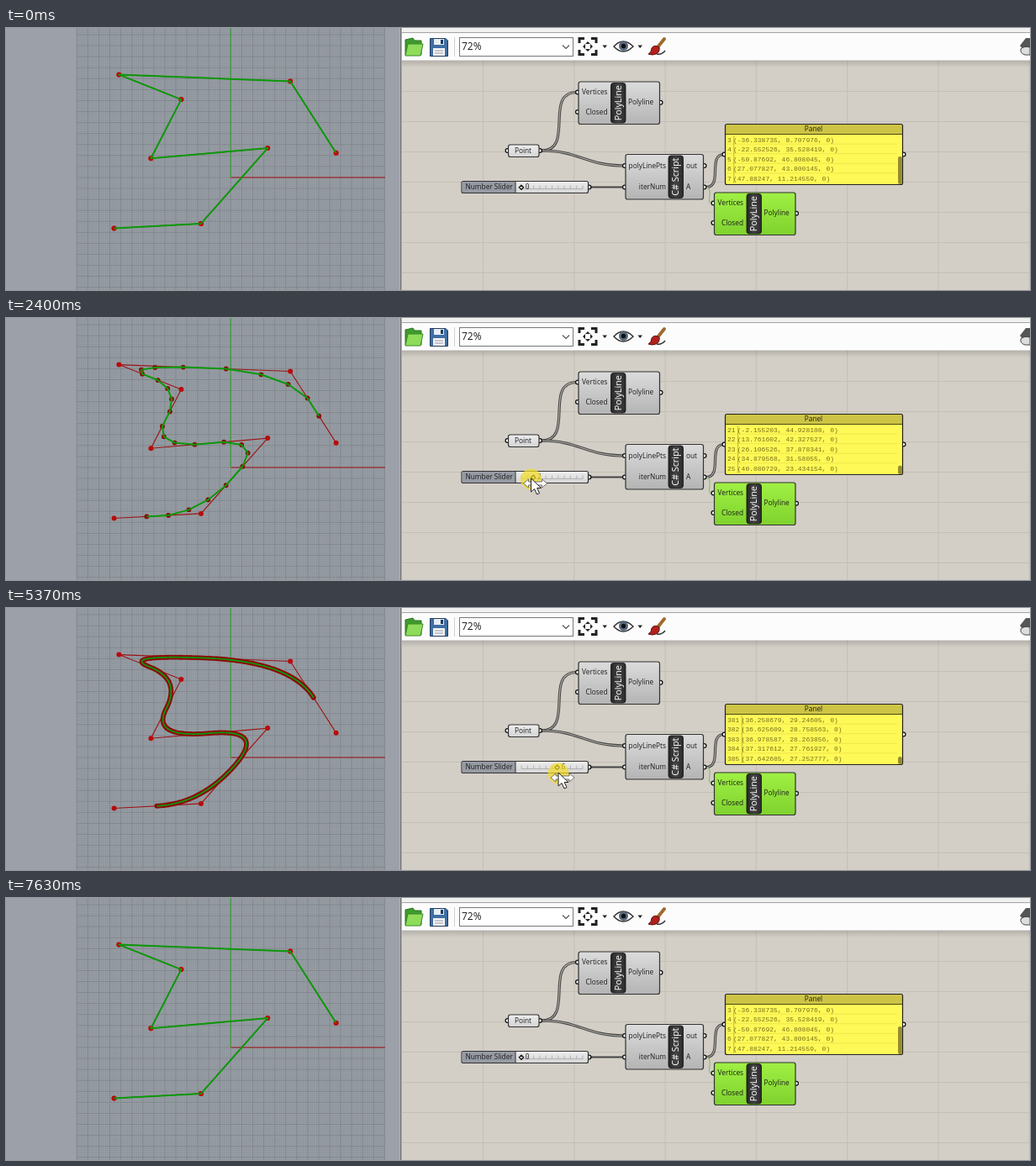
An HTML page for the animation above (7780 ms loop, 1218x312 px).

```html
<!DOCTYPE html>
<html lang="en">
<head>
<meta charset="utf-8">
<title>Corner cutting</title>
<style>
html, body { margin: 0; width: 100%; height: 100%; overflow: hidden; background: #9ca1a9; }
svg { display: block; width: 1218px; height: 312px; }
text { font: 8.3px "Open Sans", "Noto Sans", sans-serif; fill: #1c1c1c; white-space: pre; }
.end { text-anchor: end; }
.mid { text-anchor: middle; }
.tag { font-size: 10.8px; fill: #fff; text-anchor: middle; }
.row { font: 8px "Liberation Mono", monospace; fill: #777018; }
.dots { fill: none; stroke-linecap: round; }
</style>
</head>
<body>
<svg id="stage" viewBox="0 0 1218 312" xmlns="http://www.w3.org/2000/svg">
  <defs>
    <linearGradient id="grey" x2="0" y2="1"><stop stop-color="#dcdcdc"/><stop offset="1" stop-color="#b4b4b4"/></linearGradient>
    <linearGradient id="light" x2="0" y2="1"><stop stop-color="#eee"/><stop offset="1" stop-color="#d4d4d4"/></linearGradient>
    <linearGradient id="green" x2="0" y2="1"><stop stop-color="#a0f044"/><stop offset="1" stop-color="#7fd22e"/></linearGradient>
    <linearGradient id="black" x2="1" y2="0"><stop stop-color="#262626"/><stop offset=".5" stop-color="#444"/><stop offset="1" stop-color="#2a2a2a"/></linearGradient>
    <linearGradient id="shade" x2="0" y2="1"><stop stop-opacity=".16"/><stop offset="1" stop-opacity="0"/></linearGradient>
    <clipPath id="view"><rect width="451" height="312"/></clipPath>
  </defs>
  <rect width="1218" height="312" fill="#9ca1a9"/>
  <g id="viewport" clip-path="url(#view)">
    <rect x="83.5" width="367" height="312" fill="#989ea5"/>
    <path id="minor" stroke="#8b9198" stroke-width=".5"/>
    <path id="major" stroke="#7f858c" stroke-width=".8"/>
    <path d="M267.3 178H451" stroke="#983a3c" stroke-width="1.3"/>
    <path d="M267.3 178V0" stroke="#3a9a3c" stroke-width="1.3"/>
    <path id="cage" fill="none" stroke="#9c1212" stroke-width="1.1"/>
    <path id="cageDots" class="dots" stroke="#b80c0c" stroke-width="6"/>
    <path id="curveDots" class="dots" stroke="#8a0c08" stroke-width="5.8"/>
    <path id="curve" fill="none" stroke="#0a9a0a" stroke-width="2" stroke-linejoin="round"/>
  </g>

  <rect x="468" width="750" height="312" fill="#f0f0f0"/>
  <path d="M469.5 0V312" stroke="#6e7074" stroke-width="2"/>
  <path d="M470 5.5H1218" stroke="#a5a5a5"/>
  <rect x="471" y="6" width="747" height="33" fill="#fcfcfc"/>
  <rect x="471" y="39" width="747" height="273" fill="#d3cec6"/>
  <path id="sheet" stroke="#c3beb6"/>
  <rect x="471" y="38" width="747" height="9" fill="url(#shade)"/>

  <g id="toolbar">
    <path d="M475 14L484 12L486 15H494V32H475Z" fill="#3f9b2d" stroke="#2a7420"/>
    <path d="M478 19H496L493 33H475Z" fill="#8fdc5a" stroke="#3c8a2a"/>
    <path d="M504.500 12.500H523L525.500 15V33.500H504.500Z" fill="#3f6ea5" stroke="#203a5c"/>
    <path d="M509 13H521V20H509Z" fill="#e8eef5"/><path d="M517 14H520V19H517Z" fill="#203a5c"/>
    <path d="M508 24H522V33H508Z" fill="#f4f4f4"/><path d="M510 27H520M510 30H520" stroke="#99a"/>
    <path d="M533.500 11V34" stroke="#d0d0d0"/>
    <rect x="539.500" y="11.500" width="135" height="22" fill="#fff" stroke="#777"/>
    <text x="542" y="26" style="font-size:12px">72%</text>
    <path d="M662 20.500L666 24.500L670 20.500" fill="none" stroke="#555" stroke-width="1.200"/>
    <path d="M682 18V12.500H688M696 12.500H702V18M702 26V31.500H696M688 31.500H682V26" fill="none" stroke="#222" stroke-width="3"/>
    <path d="M692 16L695 19H689ZM692 28L689 25H695ZM686 22L689 19V25ZM698 22L695 25V19Z" fill="#222"/>
    <path d="M709.500 20.500H715L712.200 24ZM751.500 20.500H757L754.200 24Z" fill="#222"/>
    <path d="M723 22Q734 10 746 22Q734 34 723 22Z" fill="#fff" stroke="#333" stroke-width="1.500"/>
    <circle cx="734.500" cy="21.500" r="5.500" fill="#56697c"/><circle cx="734.500" cy="21.500" r="2.700" fill="#111"/>
    <path d="M783 13L775 23" stroke="#a06a2c" stroke-width="4" stroke-linecap="round"/>
    <path d="M764 31Q768 29 768 24Q771 19 777 23Q778 29 773 31Q769 33 764 31Z" fill="#b3201c" stroke="#5a1010"/>
    <path d="M774 31Q780 32 784 27" fill="none" stroke="#333" stroke-width="1.500"/>
    <path d="M1206 21L1213 12H1218V26H1210Z" fill="#555"/>
    <path d="M1207 25Q1211 21 1218 23V32H1212Q1206 30 1207 25Z" fill="#ddd" stroke="#444"/>
  </g>

  <g id="wires" fill="none"></g>
  <g id="nodes"></g>

  <g id="slider">
    <rect x="542" y="182.500" width="150.500" height="14" rx="2" fill="url(#light)" stroke="#333" stroke-width="1.200"/>
    <path d="M544 183H606V196H544Q542.600 196 542.600 194.500V184.500Q542.600 183 544 183Z" fill="#969aa3"/>
    <path d="M606 183V196" stroke="#333"/>
    <text x="546.500" y="192.300">Number Slider</text>
    <path id="ticks" stroke="#a8a8a8" stroke-width=".8" fill="none"/>
    <path id="knob" d="M0 -2.600L2.600 0L0 2.600L-2.600 0Z" fill="#fff" stroke="#111" stroke-width="1.300"/>
    <text id="count" y="192.400"></text>
  </g>

  <g id="panel">
    <rect x="855.500" y="114.500" width="211" height="72" rx="2" fill="#fff957"/>
    <path d="M856 126V115H1066V126Z" fill="#cdc445"/>
    <path id="rules" stroke="#efe64a" stroke-width="1"/>
    <path d="M856 126.500H1066" stroke="#4b4714"/>
    <text class="mid" x="960.500" y="123">Panel</text>
    <path id="bar" stroke="#a59d30" stroke-width=".7"/>
    <g id="rows"></g>
    <rect id="thumb" x="1061" width="4.800" rx="2.200" fill="#968e2c"/>
    <rect x="855.500" y="114.500" width="211" height="72" rx="2" fill="none" stroke="#222" stroke-width="1.200"/>
  </g>

  <g id="cursor">
    <circle id="press" r="12.500" cy="1" fill="#f3dc28" fill-opacity=".72"/>
    <path id="resize" d="M-9 6L-3 1V4H13V1L19 6L13 11V8H-3V11Z" fill="#fff" stroke="#666" stroke-width=".9"/>
    <path d="M0 0V16L4 12.500L7 19L10 17.700L7.200 11.500H12Z" fill="#fff" stroke="#222" stroke-linejoin="round"/>
  </g>
</svg>
<script>
const LOOP = 7780, UNIT = 2.615, ORIGIN = [267.4, 178];
const NS = "http://www.w3.org/2000/svg";
const $ = id => document.getElementById(id);
const set = (el, attrs) => { for (const k in attrs) el.setAttribute(k, attrs[k]); return el; };
const add = (parent, tag, attrs, text = "") => {
  const el = set(document.createElementNS(NS, tag), attrs);
  el.textContent = text;
  return parent.appendChild(el);
};

const cagePoints = [
  [-53.1, -23.15], [-13.55, -21], [16.75, 13.35], [-36.338735, 8.707976],
  [-22.552526, 35.528419], [-50.87692, 46.808045], [27.077827, 43.800145], [47.88247, 11.214559]
];

// Cursor path: time, x, y
const path = [
  [70, 1012, 302], [300, 880, 290], [560, 660, 232], [690, 600, 206], [770, 598, 198], [840, 610, 196],
  [980, 610.5, 194], [1150, 611, 193], [1300, 611, 193], [1380, 612, 191], [1920, 613.5, 191],
  [2230, 621, 191], [2390, 621, 191], [2400, 624.5, 191], [2630, 628.3, 192], [3180, 628.6, 192],
  [3250, 629.3, 193], [3565, 629.3, 193], [3570, 631.5, 193], [3720, 635.5, 194], [4585, 635.5, 194],
  [4590, 638, 195], [4730, 641, 195], [4895, 641, 195], [4900, 643.2, 196], [4970, 643.2, 196],
  [5370, 657, 196], [5515, 657, 196], [5520, 658, 196], [5900, 656, 196], [6070, 638.2, 193],
  [6160, 638, 193], [6620, 617, 192], [6690, 614, 192], [6770, 612, 193], [6840, 615, 195],
  [6990, 642, 205], [7150, 690, 240]
];

function tipAt(t) {
  const i = path.findIndex(key => key[0] > t);
  if (i < 1) return path[i ? path.length - 1 : 0].slice(1);
  const [t0, x0, y0] = path[i - 1], [t1, x1, y1] = path[i];
  const k = (t - t0) / (t1 - t0);
  return [x0 + (x1 - x0) * k, y0 + (y1 - y0) * k];
}

const mix = (a, b, k) => [a[0] + (b[0] - a[0]) * k, a[1] + (b[1] - a[1]) * k];
const cutCorners = pts => pts.slice(1).flatMap((p, i) => [mix(pts[i], p, .25), mix(pts[i], p, .75)]);
const levels = [cagePoints];
while (levels.length < 7) levels.push(cutCorners(levels[levels.length - 1]));

const toScreen = ([x, y]) => [(ORIGIN[0] + x * UNIT).toFixed(2), (ORIGIN[1] - y * UNIT).toFixed(2)];
const linePath = pts => "M" + pts.map(toScreen).join("L");
const dotPath = pts => pts.map(p => `M${toScreen(p)}h.01`).join("");

function gridPath(every) {
  let d = "";
  for (let i = -70; i <= 70; i += every) {
    const [x, y] = toScreen([i, -i]);
    d += `M${x} 0V312M84 ${y}H450.500`;
  }
  return d;
}

function wire(x0, y0, x1, y1, bend, double) {
  const d = `M${x0} ${y0}C${x0 + bend} ${y0} ${x1 - bend} ${y1} ${x1} ${y1}`;
  add($("wires"), "path", { d, stroke: "#454545", "stroke-width": double ? 3.2 : 2 });
  if (double) add($("wires"), "path", { d, stroke: "#b5b2ac", "stroke-width": 1.1 });
}

function node({ x, y, w, h, fill = "grey", grips, labels, tag }) {
  const g = add($("nodes"), "g", {});
  for (const [cx, cy] of grips)
    add(g, "circle", { cx, cy, r: 2.4, fill: "#fff", stroke: "#111", "stroke-width": 1.3 });
  add(g, "rect", { x, y, width: w, height: h, rx: 2.5, fill: `url(#${fill})`, stroke: "#333", "stroke-width": 1.2 });
  for (const [text, tx, ty, cls = ""] of labels) add(g, "text", { x: tx, y: ty, class: cls }, text);
  if (!tag) return;
  const [text, tx, tw] = tag;
  add(g, "rect", { x: tx, y: y + 1.5, width: tw, height: h - 3, rx: 3, fill: "url(#black)", stroke: "#111", "stroke-width": .8 });
  add(g, "text", { class: "tag", transform: `translate(${tx + tw / 2 + 3.7} ${y + h / 2}) rotate(-90)` }, text);
}

function polylineNode(x, y, fill) {
  node({
    x, y, w: 96.5, h: 50.5, fill,
    grips: [[x - 1, y + 12.5], [x - 1, y + 36], [x + 97.5, y + 24.8]],
    labels: [["Vertices", x + 34.5, y + 15.2, "end"], ["Closed", x + 34.5, y + 39, "end"], ["Polyline", x + 59, y + 27.3]],
    tag: ["PolyLine", x + 38.5, 17.5]
  });
}

function build() {
  set($("minor"), { d: gridPath(1) });
  set($("major"), { d: gridPath(5) });
  set($("cage"), { d: linePath(cagePoints) });
  set($("cageDots"), { d: dotPath(cagePoints) });

  let sheet = "", ticks = "M613 191.500H686", rules = "";
  for (let x = 567.5; x < 1218; x += 108.3) sheet += `M${x} 39V312`;
  for (let y = 75.5; y < 312; y += 36) sheet += `M471 ${y}H1218`;
  for (let i = 0; i <= 10; i++) ticks += `M${613 + i * 7.3} 191.500v-4`;
  for (let i = 1; i < 5; i++) rules += `M857 ${126.5 + i * 11.6}H1060`;
  set($("sheet"), { d: sheet });
  set($("ticks"), { d: ticks });
  set($("rules"), { d: rules });

  wire(637, 146, 679, 76.5, 40, true);
  wire(637, 146, 735, 164, 45, true);
  wire(695, 189.5, 735, 189.5, 10);
  wire(833, 189.5, 854, 150.5, 20, true);
  add($("wires"), "path", { d: "M833 190C843 192 831 208 840 209", stroke: "#9fbf86", "stroke-width": 1.5 });

  polylineNode(681, 64);
  polylineNode(842.5, 196, "green");
  node({
    x: 597.5, y: 139, w: 36.5, h: 14.5, fill: "light",
    grips: [[596.5, 146], [635, 146]], labels: [["Point", 615, 149, "mid"]]
  });
  node({
    x: 737, y: 150.5, w: 92.5, h: 53.5,
    grips: [[736, 164], [736, 189.5], [830.5, 164], [830.5, 189.5]],
    labels: [["polyLinePts", 785, 166.7, "end"], ["iterNum", 785, 192.2, "end"], ["out", 809, 166.7], ["A", 809, 192.2]],
    tag: ["C# Script", 788, 17.5]
  });
  for (const [cx, cy] of [[693.5, 189.5], [854.5, 150.5], [1067.5, 150.5]])
    add($("nodes"), "circle", { cx, cy, r: 2.4, fill: "#fff", stroke: "#111", "stroke-width": 1.3 });
  for (let i = 0; i < 10; i++) add($("rows"), "text", { class: "row", y: 135.8 + (i >> 1) * 11.55 });
}

const format = v => String(+v.toFixed(6));
let shown = -1;

function showLevel(level) {
  if (level === shown) return;
  shown = level;
  const pts = levels[level], first = pts.length - 5;
  set($("curve"), { d: linePath(pts), "stroke-width": level > 2 ? 1.7 : 2 });
  set($("curveDots"), { d: dotPath(pts), stroke: level ? "#8a0c08" : "#c00808" });
  set($("knob"), { transform: `translate(${613 + level * 7.1} 189.800)` });
  set($("count"), { x: 617.8 + level * 7.1 }).textContent = level;

  const left = 858 + 4.8 * String(first).length + 2.2;
  const rows = $("rows").children;
  for (let i = 0; i < 5; i++) {
    const [x, y] = pts[first + i];
    set(rows[2 * i], { x: 858 }).textContent = first + i;
    set(rows[2 * i + 1], { x: left }).textContent = `(${format(x)}, ${format(y)}, 0)`;
  }
  set($("bar"), { d: `M${left + .8} 128V185` });
  const height = Math.max(9, 265 / pts.length);
  set($("thumb"), { y: 186 - height, height });
}

function draw(t) {
  const [x, y] = tipAt(t);
  const dragging = t >= 1620 && t < 6770;
  showLevel(dragging ? Math.max(0, Math.min(6, Math.round((x - 612.3) / 7.1))) : 0);
  set($("cursor"), {
    transform: `translate(${x.toFixed(2)} ${y.toFixed(2)})`,
    visibility: t >= 70 && t < 7150 ? "visible" : "hidden"
  });
  $("press").style.display = t >= 1530 && t < 6770 ? "" : "none";
  $("resize").style.display = t >= 1300 && t < 6840 ? "" : "none";
}

build();
const start = performance.now();
function tick() {
  draw((performance.now() - start) % LOOP);
  requestAnimationFrame(tick);
}
tick();
</script>
</body>
</html>
```
